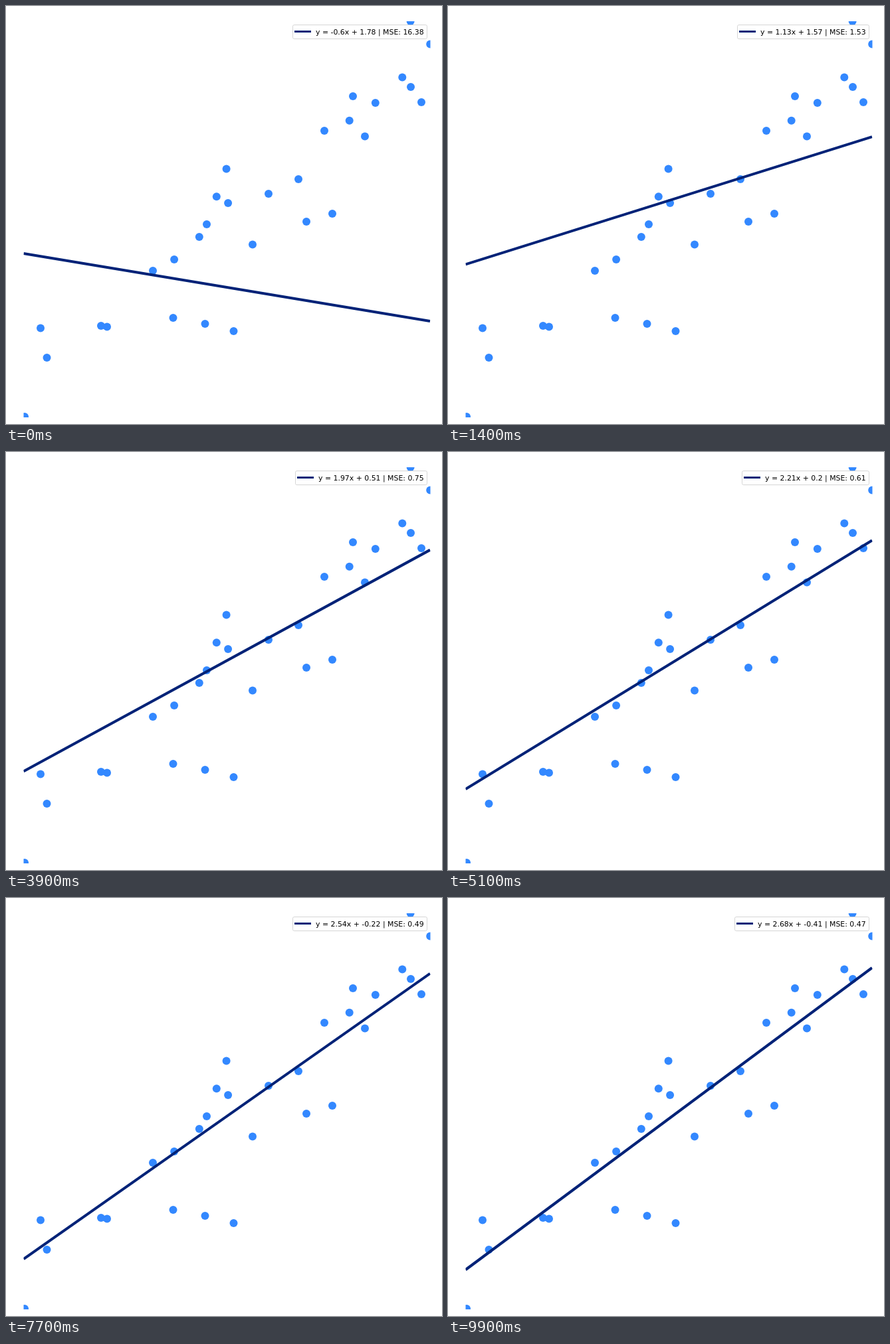
Recreate the animation shown at these times as an HTML page with a canvas. Size 656 by 630 pixels, loop 10 s.

```html
<!DOCTYPE html>
<html lang="en">
<head>
<meta charset="utf-8">
<title>Gradient descent line fit</title>
<style>
  html, body { margin: 0; width: 100%; height: 100%; overflow: hidden; background: #fff; }
  canvas { display: block; }
</style>
</head>
<body>
<canvas id="stage" width="656" height="630"></canvas>
<script>
const ctx = document.getElementById('stage').getContext('2d');
const DOT = '#3388ff', LINE = '#002277';
const STEPS = 100, STEP_MS = 100;

// Evenly timed dots along a parabola: start, step and bend
function trail(n, x, y, dx, dy, ax = 0, ay = 0) {
  return Array.from({ length: n }, (_, i) => [x + dx * i + ax * i * i, y + dy * i + ay * i * i]);
}

// Most dots lie on short arcs; a few stand alone
const dots = [
  ...trail(4, 28, 619, 5, -110, 28.5, 21.1),
  ...trail(4, 221, 399, 29.3, -8.5, 2.8, -8.5),
  ...trail(5, 479, 188, 37, -9.4, 0.7, -5.8),
  ...trail(3, 302, 329, 14.8, -41.7),
  ...trail(3, 440, 261, 79.7, -131, 2.3, 6),
  ...trail(2, 609, 122, 16, 23),
  ...trail(2, 452, 325, 39, -12),
  [52, 485.5], [143, 482], [251.5, 470], [342.5, 490], [371, 359.5], [395, 283], [540, 196.5]
];

// Plot scale: data units to pixels
const xMin = 0.016, xMax = 1.951, left = 26.5, right = 638;
const toY = v => 528.3 - 87.7 * v;

// Least-squares optimum and moments of x
const best = { m: 2.872, b: -0.649, mse: 0.4535 };
const meanX = 1.11, meanXX = 1.5425, rate = 0.2;

function loss(m, b) {
  const dm = m - best.m, db = b - best.b;
  return best.mse + db * db + 2 * meanX * db * dm + meanXX * dm * dm;
}

function descend(m, b) {
  const dm = m - best.m, db = b - best.b;
  return [m - rate * (meanX * db + meanXX * dm), b - rate * (db + meanX * dm)];
}

// Undo one descent step to find the weights before the first update
function ascend(m, b) {
  const dm = m - best.m, db = b - best.b;
  const p = 1 - rate * meanXX, q = -rate * meanX, r = 1 - rate;
  const det = p * r - q * q;
  return [best.m + (r * dm - q * db) / det, best.b + (p * db - q * dm) / det];
}

// Each state pairs the updated weights with the loss before the update
const states = [];
let [m, b] = ascend(-0.6014, 1.78);
for (let i = 0; i < STEPS; i++) {
  const mse = loss(m, b);
  [m, b] = descend(m, b);
  states.push({ m, b, mse });
}

function num(v) {
  const r = Math.round(v * 100) / 100;
  return Number.isInteger(r) ? r.toFixed(1) : String(r);
}

function stroke(x1, y1, x2, y2, width) {
  ctx.strokeStyle = LINE;
  ctx.lineWidth = width;
  ctx.beginPath();
  ctx.moveTo(x1, y1);
  ctx.lineTo(x2, y2);
  ctx.stroke();
}

function drawPlot(s) {
  ctx.save();
  ctx.beginPath();
  ctx.rect(26.5, 23, 612, 597);
  ctx.clip();
  ctx.fillStyle = DOT;
  for (const [x, y] of dots) {
    ctx.beginPath();
    ctx.arc(x, y, 6, 0, Math.PI * 2);
    ctx.fill();
  }
  stroke(left, toY(s.m * xMin + s.b), right, toY(s.m * xMax + s.b), 4.1);
  ctx.restore();
}

function drawLegend(s) {
  const label = `y = ${num(s.m)}x + ${num(s.b)} | MSE: ${num(s.mse)}`;
  ctx.font = '10.9px "DejaVu Sans", sans-serif';
  const textX = Math.round(628.6 - ctx.measureText(label).width);
  const boxX = textX - 34.5;
  ctx.beginPath();
  ctx.roundRect(boxX, 28.5, 633.5 - boxX, 21, 2.2);
  ctx.fillStyle = 'rgba(255,255,255,0.8)';
  ctx.fill();
  ctx.strokeStyle = 'rgba(204,204,204,0.8)';
  ctx.lineWidth = 1;
  ctx.stroke();
  stroke(textX - 32, 38.5, textX - 7, 38.5, 3);
  ctx.fillStyle = '#000';
  ctx.fillText(label, textX, 43);
}

function render(now) {
  const s = states[Math.floor(now / STEP_MS) % STEPS];
  ctx.fillStyle = '#fff';
  ctx.fillRect(0, 0, 656, 630);
  drawPlot(s);
  drawLegend(s);
}

let start = null;
function tick(now) {
  if (start === null) start = now;
  render(now - start);
  requestAnimationFrame(tick);
}
render(0);
requestAnimationFrame(tick);
</script>
</body>
</html>
```
